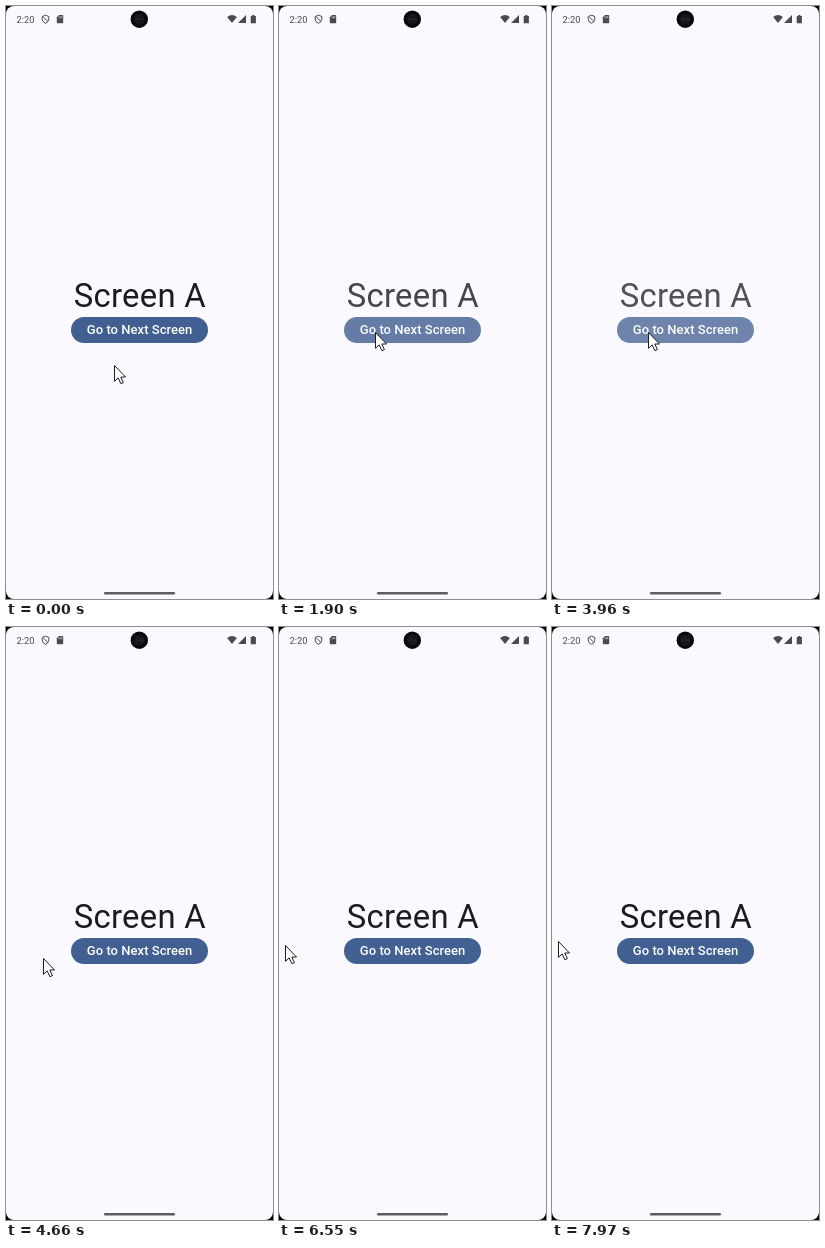
These frames come from a looping animation (267x593 px, 8000 ms). An HTML page:

```html
<!DOCTYPE html>
<html lang="en">
<head>
<meta charset="utf-8">
<title>Screen navigation</title>
<style>
  html, body { margin: 0; width: 100%; height: 100%; overflow: hidden; background: #000; }
  svg { display: block; width: 100vw; height: 100vh; font-family: Roboto, sans-serif; }
</style>
</head>
<body>
<svg viewBox="0 0 267 593">
  <rect width="267" height="593" rx="8" fill="#f9f9ff"/>

  <g fill="#4a4b50">
    <text x="10.6" y="16.8" font-size="9.3">2:20</text>
    <path d="M39.5 9.2l3.3 1.3v2.6q0 2.9-3.3 4.2q-3.3-1.3-3.3-4.2v-2.6zM37.2 10.8l4.6 4.6" fill="none" stroke="#4a4b50"/>
    <path d="M53 9h3.4q.8 0 .8.8v6.6q0 .8-.8.8h-4.8q-.8 0-.8-.8v-5.1z"/>
    <path d="M52.9 10.6v1.6M54.3 10.2v2M55.7 10.2v2" stroke="#f9f9ff" stroke-width=".6"/>
    <path d="M226 17l-4.9-6q4.9-4 9.8 0z"/>
    <path d="M240 9v8h-8z"/>
    <path d="M246.2 9h2.2v.9h1.5v7.3h-5.2V9.9h1.5z"/>
  </g>
  <circle cx="133.3" cy="13.2" r="8.7" fill="#08090b"/>
  <circle cx="133.3" cy="13.2" r="5.4" fill="#17181c"/>
  <path d="M130 13.2h7" stroke="#34394a" stroke-dasharray="1.4 1.4"/>
  <rect x="98" y="586" width="71" height="2.4" rx="1.2" fill="#5d5e63"/>

  <g id="page" text-anchor="middle">
    <text x="133.8" y="301" font-size="32.8" letter-spacing=".3" fill="#191c20">Screen A</text>
    <rect x="65" y="311" width="137" height="26" rx="13" fill="#415f91"/>
    <text x="133.6" y="328.4" font-size="13" font-weight="500" letter-spacing=".04" fill="#fff">Go to Next Screen</text>
  </g>

  <g id="back">
    <circle r="16" fill="#bec6dc"/>
    <path d="M2.8-5.2L-2.4 0l5.2 5.2" fill="none" stroke="#3e4759" stroke-width="2.3"/>
  </g>
  <path id="cursor" d="M.5.5V16.3L4.2 12.9l2.7 5.8 2.5-1.1L6.8 12h4.7z" fill="#fff" stroke="#1b1c20"/>
</svg>
<script>
const LOOP = 8000, STEP = 145.37, FADE = 700;
const SWIPE = 5670, SWIPE_GAP = 1150, RELEASE = 230;
const [page, back, cursor] = ["page", "back", "cursor"].map(id => document.getElementById(id));
const clamp = v => Math.max(0, Math.min(1, v));

// Mouse before the swipes: time, x, y
const path = [[0, 108, 359], [720, 102, 328], [1137, 100, 327], [1400, 96, 326],
  [4250, 96, 326], [4480, 64, 340], [4800, 6, 320], [SWIPE, 8, 319]];

// Five taps in quickening rhythm, then a fade after each back swipe.
const fades = [0, 1, 2, 3, 4].map(k => 910 + 800 * k - 27.5 * k * k);
for (const n of [0, 1]) fades.push(SWIPE + n * SWIPE_GAP + RELEASE);

// cubic-bezier(.4, 0, .2, 1)
function ease(x) {
  let lo = 0, hi = 1, s = .5;
  for (let i = 0; i < 20; i++) {
    s = (lo + hi) / 2;
    const bx = 1.2 * (1 - s) ** 2 * s + .6 * (1 - s) * s * s + s ** 3;
    if (bx < x) lo = s; else hi = s;
  }
  return s * s * (3 - 2 * s);
}

// Two identical screens cross-fade, so together they only dim.
function pageOpacity(t) {
  const start = fades.findLast(f => f <= t) ?? -FADE;
  const e = ease(clamp((t - start) / FADE));
  return 1 - e * (1 - e);
}

function mouse(t, swipeTime) {
  if (swipeTime >= 0)
    return [Math.max(6, 43 - swipeTime * .065), 319 - 5 * ((t - SWIPE) / 2300) ** 2];
  const i = path.findIndex(k => k[0] > t);
  const [t0, x0, y0] = path[i - 1], [t1, x1, y1] = path[i];
  const p = (t - t0) / (t1 - t0);
  return [x0 + (x1 - x0) * p, y0 + (y1 - y0) * p];
}

function draw(now) {
  const t = Math.max(0, 120 + STEP * Math.floor((now % LOOP - 119.9) / STEP));
  const swipeTime = t < SWIPE ? -1 : (t - SWIPE) % SWIPE_GAP;

  const [x, y] = mouse(t, swipeTime).map(Math.round);
  cursor.setAttribute("transform", `translate(${x} ${y})`);
  page.setAttribute("opacity", pageOpacity(t));

  const size = clamp((swipeTime - 40) / 70) * clamp((550 - swipeTime) / 150);
  back.setAttribute("transform", `translate(25.3 ${y - 41.7}) scale(${size})`);
  back.setAttribute("opacity", size);
}

let begin;
function tick(now) {
  begin ??= now;
  draw(now - begin);
  requestAnimationFrame(tick);
}
draw(0);
requestAnimationFrame(tick);
</script>
</body>
</html>
```
